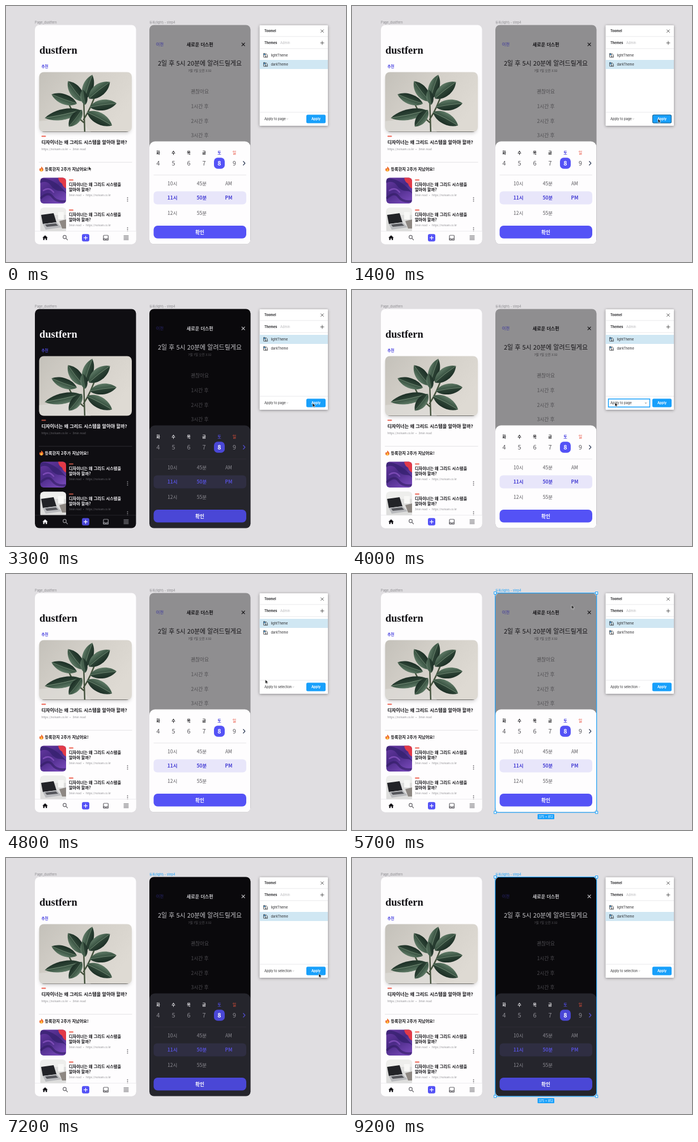
These frames come from a looping animation (600x451 px, 9300 ms). An HTML page:

```html
<!DOCTYPE html>
<html lang="ko">
<head>
<meta charset="utf-8">
<title>Theme switch</title>
<style>
html, body { margin: 0; width: 100%; height: 100%; overflow: hidden; background: #e0dee1; }
svg { display: block; width: 600px; height: 451px; }
text { font-family: "Noto Sans CJK KR", "Noto Sans CJK", sans-serif; }
.ui text, text.ui { font-family: Inter, sans-serif; }
.b { font-weight: 700; }
.c { text-anchor: middle; }
.logo { font: 700 18.5px "Liberation Serif", serif; }
.line { fill: none; stroke-linecap: round; stroke-linejoin: round; }

.light {
  --bg: #fefdfe; --ink: #111014; --meta: #8b8a8f; --rule: #dcdbe0; --brand: #5452f6; --link: #4a43e0;
  --dash: #ee6352; --icon: #66656a; --dim: #8f8e90; --back: #332d9e; --head: #141316; --time: #3c3b3e;
  --soft: #504f52; --sheet: #fefdfe; --num: #58575c; --sun: #ee7d70; --next: #34405a; --bar: #e8e6fa; --pick: #463fd4;
}
.dark {
  --bg: #0f0e12; --ink: #f4f3f6; --meta: #69686e; --rule: #333238; --brand: #4a47d6; --link: #4c48cc;
  --dash: #b64f40; --icon: #929197; --dim: #0a090c; --back: #2b2874; --head: #c5c4c8; --time: #58575c;
  --soft: #4c4b50; --sheet: #25252c; --num: #8e8d94; --sun: #b04536; --next: #514dcc; --bar: #2f2e42; --pick: #5550d6;
}

.step { animation: 9.3s step-end infinite; }
.home-dark { animation-name: homeDark; }
.modal-dark { animation-name: modalDark; }
.outline { animation-name: outline; }
.handles { animation-name: handles; }
.titled { animation-name: titled; }
.row { animation-name: row; }
.hover { animation-name: hover; }
.press { animation-name: press; }
.focus { animation-name: focus; }
.scope-page { animation-name: scopePage; }
.scope-sel { animation-name: scopeSel; }
.cursor { animation: move 9.3s ease-in-out infinite; }

@keyframes homeDark { 0%, 36.55%, 100% { opacity: 0 } 18.27% { opacity: 1 } }
@keyframes modalDark { 0%, 36.55% { opacity: 0 } 18.27%, 76.33%, 100% { opacity: 1 } }
@keyframes outline { 0%, 75.26% { opacity: 0 } 56.98%, 81.71%, 100% { opacity: 1 } }
@keyframes handles { 0%, 75.26% { opacity: 0 } 60.21%, 81.71%, 100% { opacity: 1 } }
@keyframes titled { 0% { fill: #8b8a8e } 56.98%, 100% { fill: #18a0fb } }
@keyframes row { 0%, 68.81%, 100% { transform: translateY(16px) } 27.95% { transform: none } }
@keyframes hover {
  0% { opacity: 0; transform: none }
  24.72% { opacity: 1; transform: none }
  27.95% { opacity: 0; transform: translateY(16px) }
  66.66% { opacity: 1; transform: translateY(16px) }
  68.81%, 100% { opacity: 0; transform: translateY(16px) }
}
@keyframes press { 0%, 18.27%, 35.48%, 76.33%, 100% { opacity: 0 } 12.9%, 33.33%, 74.18% { opacity: 1 } }
@keyframes focus { 0%, 49.45%, 100% { opacity: 0 } 41.93% { opacity: 1 } }
@keyframes scopePage { 0%, 100% { opacity: 1 } 48.38% { opacity: 0 } }
@keyframes scopeSel { 0% { opacity: 0 } 48.38%, 100% { opacity: 1 } }
@keyframes move {
  0%, 1.1% { transform: translate(146px, 282.5px) }
  11.2%, 18.3% { transform: translate(540px, 198.5px) }
  25.3%, 28.5% { transform: translate(512px, 79.5px) }
  33%, 38.2% { transform: translate(541px, 199px) }
  42.4%, 50% { transform: translate(464px, 198px) }
  58%, 62.3% { transform: translate(387.5px, 54.5px) }
  67.5%, 69.5% { transform: translate(500px, 101px) }
  74%, 81% { transform: translate(552px, 203.5px); opacity: 1 }
  88.2%, 90.2% { transform: translate(470px, 9px); opacity: 1 }
  90.3%, 100% { transform: translate(470px, 9px); opacity: 0 }
}
</style>
</head>
<body>
<svg viewBox="0 0 600 451">
<defs>
  <linearGradient id="wall" x2="1" y2=".5">
    <stop stop-color="#c4c1ba"/><stop offset=".5" stop-color="#d4d0c9"/><stop offset="1" stop-color="#dedad3"/>
  </linearGradient>
  <linearGradient id="green" x2="0" y2="1">
    <stop stop-color="#5f7a66"/><stop offset=".48" stop-color="#3a5443"/><stop offset=".52" stop-color="#2c4335"/><stop offset="1" stop-color="#1d2f26"/>
  </linearGradient>
  <linearGradient id="violet" x2=".6" y2="1">
    <stop stop-color="#6a3aa4"/><stop offset=".5" stop-color="#4a2a86"/><stop offset="1" stop-color="#7346b4"/>
  </linearGradient>
  <clipPath id="photoClip"><rect x="58.5" y="116.5" width="163.5" height="105" rx="8"/></clipPath>
  <clipPath id="thumbClip"><rect x="60.5" y="302.5" width="45.5" height="45.5" rx="6"/></clipPath>
  <clipPath id="deskClip"><rect x="60.5" y="355.5" width="45.5" height="45.5" rx="6"/></clipPath>
  <clipPath id="homeClip"><rect x="51" y="33.5" width="178.5" height="386" rx="8"/></clipPath>
  <clipPath id="modalClip"><rect x="253" y="33.5" width="178.5" height="386" rx="8"/></clipPath>

  <g id="leaf">
    <path d="M0 0C10-17 36-18 50 0C36 17 10 15 0 0Z" fill="url(#green)"/>
    <path d="M0 0Q25-2 49 0" class="line" stroke="#8ea38c" stroke-width=".7"/>
  </g>

  <g id="photo" clip-path="url(#photoClip)">
    <path d="M58 116H223V222H58Z" fill="url(#wall)"/>
    <path d="M58 203L125 196L150 222H58Z" fill="#e2e0dc" opacity=".6"/>
    <path d="M139 224Q138 195 137 160M137 200Q150 180 160 150M137 205Q118 190 112 175" class="line" stroke="#43513c" stroke-width="2.4"/>
    <use href="#leaf" transform="translate(137 168) rotate(-128) scale(.9 .8)"/>
    <use href="#leaf" transform="translate(138 165) rotate(-72) scale(.92 .75)"/>
    <use href="#leaf" transform="translate(146 163) rotate(-38) scale(.95 .85)"/>
    <use href="#leaf" transform="translate(125 172) rotate(-160) scale(.95 .7)"/>
    <use href="#leaf" transform="translate(148 178) rotate(-8) scale(.95 .75)"/>
    <use href="#leaf" transform="translate(132 184) rotate(168) scale(1.3 .75)"/>
    <use href="#leaf" transform="translate(143 187) rotate(28) scale(1 .8)"/>
    <use href="#leaf" transform="translate(134 183) rotate(128) scale(.75 .7)"/>
    <use href="#leaf" transform="translate(140 174) rotate(-100) scale(.55 .5)"/>
  </g>

  <g id="paint" clip-path="url(#thumbClip)">
    <path d="M60 302H107V349H60Z" fill="url(#violet)"/>
    <path d="M92 302H107V322Q101 320 99 313Q93 310 92 302Z" fill="#e23a48"/>
    <path d="M60 312Q72 306 79 316T97 326T107 338V330Q97 318 88 312T70 304L60 303Z" fill="#35206e" opacity=".75"/>
    <path d="M62 338Q75 326 82 336T104 344" class="line" stroke="#2f1c62" stroke-width="4" opacity=".6"/>
    <path d="M66 325Q76 318 84 328" class="line" stroke="#8e58c6" stroke-width="2.5" opacity=".7"/>
  </g>

  <g id="desk" clip-path="url(#deskClip)">
    <path d="M60 355H107V402H60Z" fill="#dddddc"/>
    <path d="M60 355H107V368H60Z" fill="#eeeeec"/>
    <path d="M62 368L84 365L89 381L65 384Z" fill="#222327"/>
    <path d="M65 384L89 381L98 390L70 394Z" fill="#b9babd"/>
    <path d="M69 385L88 383L92 387L72 389Z" fill="#55565b"/>
    <path d="M92 363H102V376H92Z" fill="#f8f8f6"/>
    <path d="M94 379L106 376V392L99 392Z" fill="#8e8883"/>
  </g>

  <g id="dots" fill="var(--icon)"><circle cx="214.5" cy="337.7" r=".9"/><circle cx="214.5" cy="340.7" r=".9"/><circle cx="214.5" cy="343.7" r=".9"/></g>

  <g id="item">
    <rect x="111" y="305.5" width="8" height="2" rx="1" fill="var(--dash)"/>
    <g class="b" font-size="7.2" fill="var(--ink)">
      <text x="111" y="317.2">디자이너는 왜 그리드 시스템을</text>
      <text x="111" y="326.4">알아야 할까?</text>
    </g>
    <g font-size="4.6" fill="var(--meta)">
      <text x="111" y="335">3min read</text><text x="136" y="335">•</text><text x="141" y="335">https://nolvam.co.kr</text>
    </g>
    <use href="#dots"/>
  </g>

  <g id="home" clip-path="url(#homeClip)">
    <path d="M51 33H230V420H51Z" fill="var(--bg)"/>
    <text class="logo" x="59" y="84" fill="var(--ink)">dustfern</text>
    <text class="b" x="62.5" y="108.7" font-size="6.6" fill="var(--link)">추천</text>
    <rect x="60" y="120" width="160" height="102" rx="8" style="filter: drop-shadow(0 2px 3px #0003)"/>
    <use href="#photo"/>
    <rect x="62.5" y="228.5" width="8" height="2" rx="1" fill="var(--dash)"/>
    <text class="b" x="62.5" y="243" font-size="8.2" fill="var(--ink)">디자이너는 왜 그리드 시스템을 알아야 할까?</text>
    <g font-size="4.9" fill="var(--meta)">
      <text x="62.5" y="254">https://nolvam.co.kr</text><text x="112.3" y="254">•</text><text x="117.5" y="254">3min read</text>
    </g>
    <path d="M58 275.3H222.5" stroke="var(--rule)" stroke-width=".8"/>
    <path d="M62 282.8Q66.5 286 66 289Q65.300 291.600 62.500 291.600Q59.200 291.500 58.900 288.500Q58.900 286.500 60.300 285.200Q60.600 286.400 61.300 286.700Q62.600 285 62 282.800Z" fill="#ee6a2c"/>
    <path d="M62.600 286.700Q64.700 288.500 64.300 290Q63.800 291.400 62.500 291.400Q60.800 291.200 60.800 289.700Q61 288.400 62.600 286.700Z" fill="#ffc640"/>
    <text class="b" x="68.5" y="290" font-size="7.2" fill="var(--ink)">등록한지 2주가 지났어요!</text>
    <use href="#paint"/>
    <use href="#desk"/>
    <use href="#item"/>
    <use href="#item" y="53"/>
    <path d="M51 396.800H230V420H51Z" fill="var(--bg)"/>
    <path d="M51 396.800H230" stroke="var(--rule)" stroke-width=".6"/>
    <path d="M64.300 408.300L69 404L73.700 408.300H72.400V412.300H70V409.500H68V412.300H65.600V408.300Z" fill="var(--ink)"/>
    <g class="line" stroke="var(--icon)" stroke-width="1.2">
      <circle cx="103.500" cy="407" r="2.800"/><path d="M105.700 409.200L108.500 412"/>
      <rect x="172" y="404" width="8.400" height="8.400" rx="1"/>
      <path d="M172 409.500H174.500Q176.200 412 177.900 409.500H180.400V412H172Z"/>
      <path d="M208 404.800H216M208 407.100H216M208 409.400H216M208 411.700H216" stroke-width="1"/>
    </g>
    <rect x="134" y="401.800" width="13" height="13" rx="3" fill="var(--brand)"/>
    <path d="M137.500 408.300H143.500M140.500 405.300V411.300" class="line" stroke="#fff" stroke-width="1.200"/>
  </g>

  <g id="modal" clip-path="url(#modalClip)">
    <path d="M252 33H432V420H252Z" fill="var(--dim)"/>
    <text x="264.800" y="69.800" font-size="7.200" fill="var(--back)">이전</text>
    <path d="M416.200 65.200L421.200 70.200M421.200 65.200L416.200 70.200" class="line" stroke="var(--head)" stroke-width="1.200"/>
    <g class="c">
      <g fill="var(--head)">
        <text class="b" x="342.300" y="70.600" font-size="8.100">새로운 더스펀</text>
        <text x="342" y="104.700" font-size="11">2일 후 5시 20분에 알려드릴게요</text>
      </g>
      <text x="342" y="115.700" font-size="5.400" fill="var(--time)">7월 7일 오전 3:32</text>
      <g font-size="8.700" fill="var(--soft)">
        <text x="342" y="154.300">괜찮아요</text><text x="342" y="180">1시간 후</text>
        <text x="342" y="205.700">2시간 후</text><text x="342" y="231.400">3시간 후</text>
      </g>
      <rect x="253" y="238.500" width="178.500" height="200" rx="10" fill="var(--sheet)"/>
      <g class="b" font-size="7" fill="var(--ink)">
        <text x="268.500" y="261">화</text><text x="295.500" y="261">수</text><text x="322.500" y="261">목</text><text x="349.500" y="261">금</text>
        <text x="376.500" y="261" fill="var(--link)">토</text><text x="403" y="261" fill="var(--sun)">일</text>
      </g>
      <rect x="367" y="267.300" width="19" height="19.400" rx="6.500" fill="var(--brand)"/>
      <g font-size="10.800" fill="var(--num)">
        <text x="268.500" y="281">4</text><text x="295.500" y="281">5</text><text x="322.500" y="281">6</text><text x="349.500" y="281">7</text>
        <text class="b" x="376.500" y="281" fill="#fff">8</text><text x="403" y="281">9</text>
      </g>
      <path d="M418.800 273.800L421.800 277L418.800 280.200" class="line" stroke="var(--next)" stroke-width="1.300"/>
      <path d="M260.500 297.800H424" stroke="var(--rule)" stroke-width=".7"/>
      <rect x="260.500" y="326.500" width="163.500" height="23" rx="6" fill="var(--bar)"/>
      <g font-size="8.500" fill="var(--num)">
        <text x="293.700" y="316.300">10시</text><text x="345.500" y="316.300">45분</text><text x="393" y="316.300">AM</text>
        <g class="b" fill="var(--pick)"><text x="293.700" y="341.300">11시</text><text x="345.500" y="341.300">50분</text><text x="393" y="341.300">PM</text></g>
        <text x="293.700" y="368">12시</text><text x="345.500" y="368">55분</text>
      </g>
      <rect x="260.500" y="387" width="163.500" height="22.600" rx="7" fill="var(--brand)"/>
      <text class="b" x="342" y="401.500" font-size="8.600" fill="#fff">확인</text>
    </g>
  </g>

  <g id="swatch" class="line" stroke="#2b2b2e" stroke-width=".8">
    <rect x="454.500" y="83.700" width="3" height="6.600" rx=".6"/>
    <path d="M457.500 85.500L459 84L461.500 86.500L457.800 90.300H461.500V88"/>
    <path d="M454.900 84.300H457.100V86.300H454.900Z" fill="#2f86c4" stroke="none"/>
  </g>
  <path id="down" d="M-1.100 -.5L0 .6L1.100 -.5" class="line" stroke-width=".7"/>
  <rect id="grip" x="-2" y="-2" width="4" height="4" fill="#fff" stroke="#18a0fb"/>
</defs>

<path d="M0 0H600V451H0Z" fill="#e0dee1"/>
<text class="ui" x="51" y="31" font-size="5.700" fill="#8b8a8e">Page_dustfern</text>
<text class="ui step titled" x="253" y="31" font-size="5.500" fill="#8b8a8e">등록(light) - step4</text>

<use href="#home" class="light"/>
<use href="#home" class="dark step home-dark"/>
<use href="#modal" class="light"/>
<use href="#modal" class="dark step modal-dark"/>

<rect class="step outline" x="252.700" y="33.500" width="179" height="386.500" fill="none" stroke="#18a0fb" stroke-width="1.200"/>
<g class="ui step handles">
  <use href="#grip" x="252.700" y="33.500"/><use href="#grip" x="431.700" y="33.500"/>
  <use href="#grip" x="252.700" y="420"/><use href="#grip" x="431.700" y="420"/>
  <rect x="327.500" y="423" width="29.500" height="9" rx="1" fill="#18a0fb"/>
  <text class="c" x="342.200" y="429.600" font-size="5.500" fill="#fff">375 × 812</text>
</g>

<g class="ui" font-size="5.700" fill="#2a2a2d">
  <rect x="447.500" y="34" width="120.500" height="177" rx="1" fill="#fff" style="filter: drop-shadow(0 1px 2.500px #0006)"/>
  <text class="b" x="456" y="46.200">Toomel</text>
  <text class="b" x="456" y="66.900">Themes</text>
  <text x="484" y="66.900" fill="#b6b6b9">Admin</text>
  <path d="M555.600 41.800L560.400 46.600M560.400 41.800L555.600 46.600M555 65H561M558 62V68" class="line" stroke="#333" stroke-width=".8"/>
  <path d="M447.500 53.800H568M447.500 75H568M447.500 187.200H568" stroke="#e4e4e6" stroke-width=".8"/>

  <g class="step hover">
    <rect x="447.500" y="79" width="120.500" height="16" fill="#ececed"/>
    <path d="M555.300 84.800H560.700M557 84.800V83.500H559V84.800M556 85V90.500H560V85M557.400 86.500V89M558.600 86.500V89" class="line" stroke="#333" stroke-width=".7"/>
  </g>
  <rect class="step row" x="447.500" y="79" width="120.500" height="16" fill="#d0e7f3"/>
  <use href="#swatch"/><text x="467.500" y="89.100">lightTheme</text>
  <use href="#swatch" y="16"/><text x="467.500" y="105.100">darkTheme</text>

  <g class="step scope-page">
    <text x="456" y="201">Apply to page</text>
    <use href="#down" x="496.500" y="199" stroke="#aaa"/>
  </g>
  <g class="step scope-sel">
    <text x="456" y="201">Apply to selection</text>
    <use href="#down" x="507" y="199" stroke="#aaa"/>
  </g>
  <g class="step focus">
    <path d="M494.500 196H499V202H494.500Z" fill="#fff"/>
    <rect x="452.500" y="192" width="73" height="14.200" fill="none" stroke="#18a0fb" stroke-width="1.500"/>
    <use href="#down" x="518.500" y="199.200" stroke="#222"/>
  </g>

  <rect x="530" y="191.500" width="34" height="15" rx="2.500" fill="#18a0fb"/>
  <rect class="step press" x="530.500" y="192" width="33" height="14" rx="2.200" fill="none" stroke="#25678f" stroke-width="1.100"/>
  <text class="b c" x="547" y="201" font-size="5.600" fill="#fff">Apply</text>
</g>

<path class="cursor" d="M0 0V7.200L1.700 5.700L2.800 8.200L4 7.700L2.900 5.200H5.200Z" fill="#111" stroke="#fff" stroke-width=".6"/>
</svg>
</body>
</html>
```
